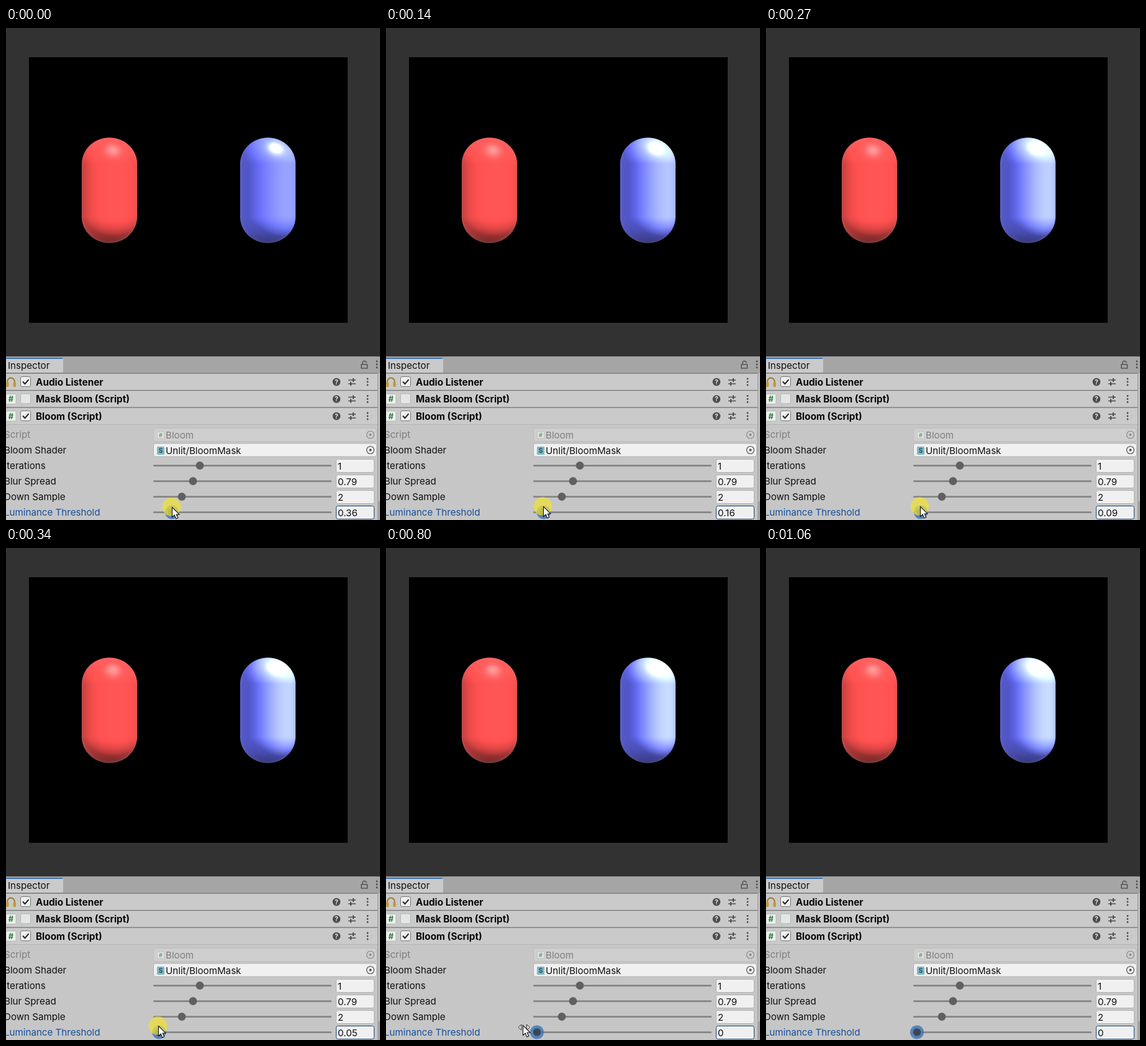
Animation of 602 by 791 pixels, one loop 1.28 s. Source, as an HTML page with a canvas:

```html
<!DOCTYPE html>
<html lang="en">
<head>
<meta charset="utf-8">
<title>Bloom threshold</title>
<style>
  html, body { margin: 0; width: 602px; height: 791px; overflow: hidden; background: #323232; }
  svg, canvas { position: absolute; display: block; }
  svg { left: 0; top: 0; }
  text { font: 15.15px Inter, sans-serif; fill: #101010; white-space: pre; }
  .bold { font-size: 15.3px; font-weight: 700; fill: #080808; }
  .dim { fill: #7d7d7d; }
  .focus { fill: #16509e; }
  .hash { font-weight: 700; fill: #2c7d46; text-anchor: middle; }
  .mark { fill: #e4e4e4; font-weight: 700; font-size: 10.5px; text-anchor: middle; }
  .shader { fill: #23506e; font-weight: 700; font-size: 10px; text-anchor: middle; }
</style>
</head>
<body>
<svg id="stage" width="602" height="791" viewBox="0 0 602 791">
  <rect width="602" height="791" fill="#323232"/>
  <rect x="37" y="47" width="513" height="427"/>
  <g id="panel"></g>
  <g id="slider">
    <circle r="11" fill="#3f78b8" opacity=".85"/>
    <circle r="6.2" fill="#3c4652"/>
  </g>
  <text id="value" x="534" y="785"></text>
  <g id="cursor">
    <circle id="glow" cx="-.5" cy="0" r="14.8" fill="#f0e038" opacity=".74"/>
    <path id="arrows" d="M-2 -1V8L-7 3.5ZM6.5 -1V8L11.5 3.5Z" fill="#fff" fill-opacity=".5" stroke="#333"/>
    <path d="M.5 .5V16.5L4.2 13L6.7 19L9.7 17.7L7.2 12H12Z" fill="#fff" stroke="#111" stroke-width="1.1"/>
  </g>
</svg>
<script>
const LOOP = 1280;
// start time, threshold, pointer x, pointer y
const STEPS = [
  [0, .36, 267, 770], [70, .25, 259, 769], [140, .16, 253, 769], [200, .12, 251, 769],
  [270, .09, 248, 769], [340, .05, 245, 768], [400, .01, 239, 768], [470, 0, 232, 767],
  [800, 0, 220, 767], [870, 0, 225, 765], [940, 0, 232, 761], [1000, 0, 238, 752],
  [1060, 0, 0, 0]
];
const HANDLES = 470, RELEASED = 800, GONE = 1060;
const $ = id => document.getElementById(id);

// Static inspector panel
const rect = (x, y, w, h, fill, extra = '') =>
  `<rect x="${x}" y="${y}" width="${w}" height="${h}" fill="${fill}" ${extra}/>`;
const text = (x, y, s, cls = '', extra = '') => `<text x="${x}" y="${y}" class="${cls}" ${extra}>${s}</text>`;
const dot = (x, y, r, fill = '#4c4c4c') => `<circle cx="${x}" cy="${y}" r="${r}" fill="${fill}"/>`;
const line = (d, color, w = 1.5) => `<path d="${d}" fill="none" stroke="${color}" stroke-width="${w}"/>`;
const menu = (x, y) => [-5, 0, 5].map(dy => dot(x, y + dy, 1.4)).join('');
const hash = (x, y, w, size) =>
  rect(x - w / 2, y - w / 2, w, w, '#edf1ed', 'rx="1.5" stroke="#b4bab4"') +
  text(x, y + size * .37, '#', 'hash', `style="font-size:${size}px"`);

function header(y, title, checked, icon) {
  const tools = `M551 ${y - 3}h12M551 ${y + 3}h12`;
  const knobs = `M559 ${y - 6}v6M555 ${y}v6`;
  return rect(0, y - 13.5, 598, 26.5, '#cacaca') +
    rect(0, y - 14.5, 598, 1.2, '#6f6f6f') + icon +
    rect(23.5, y - 8.5, 16, 16, checked ? '#efefef' : '#e2e6e4', `rx="2.5" stroke="${checked ? '#777' : '#b4b4b4'}"`) +
    (checked ? line(`M27 ${y - .5}l3.5 3.7l6 -7`, '#222', 2) : '') +
    text(48, y + 5.5, title, 'bold') +
    dot(532, y, 6.3) + text(532, y + 3.8, '?', 'mark') +
    line(tools, '#4c4c4c') + line(knobs, '#4c4c4c', 2) + menu(582, y);
}

function objectField(y, fill, border, color) {
  return rect(237.5, y - 10.5, 359, 21, fill, `rx="3" stroke="${border}"`) +
    `<circle cx="586.5" cy="${y}" r="6" fill="none" stroke="${color}" stroke-width="1.2"/>` + dot(586.5, y, 2, color);
}

function sliderRow(y, label, thumb, value) {
  const focused = thumb === undefined;
  return text(-3, y + 5, label, focused ? 'focus' : '') +
    rect(237, y - 1.7, 287, 2.6, '#858585', 'rx="1"') +
    rect(531.5, y - 10.5, 61, 21, '#f0f0f0', `rx="3" stroke="${focused ? '#1a4478' : '#b2b2b2'}"`) +
    (focused ? '' : dot(thumb, y - .5, 6.5, '#606060') + text(534, y + 6, value));
}

const headphones = line('M2 571v-2a6 6.5 0 0 1 12 0v2', '#9b7a2c', 2) +
  rect(0, 569, 4.5, 8, '#c39a35', 'rx="1.5"') + rect(11.5, 569, 4.5, 8, '#c39a35', 'rx="1.5"');

$('panel').innerHTML =
  rect(0, 528, 602, 263, '#c6c6c6') +
  rect(0, 528, 602, 27, '#a5a5a5') +
  `<path d="M0 530H89a3 3 0 0 1 3 3V554H0Z" fill="#cacaca"/>` +
  rect(0, 530, 91, 2, '#3c72b0') +
  text(3, 548, 'Inspector') +
  line('M574 541V538.5a3 3 0 0 1 6 0', '#555') + line('M572 541h9.5v6h-9.5Z', '#555') + menu(597, 541) +
  header(569, 'Audio Listener', true, headphones) +
  header(596.5, 'Mask Bloom (Script)', false, hash(8, 596.5, 16, 13)) +
  header(624, 'Bloom (Script)', true, hash(8, 624, 16, 13)) +
  rect(0, 637, 598, 1, '#b4b4b4') +
  text(-3, 659, 'Script', 'dim') + objectField(654, '#cfcfcf', '#bdbdbd', '#8c8c8c') +
  `<g opacity=".6">${hash(249, 654.5, 11, 9)}</g>` + text(257, 660, 'Bloom', 'dim') +
  text(-3, 684, 'Bloom Shader') + objectField(678.5, '#eff0ef', '#b2b2b2', '#505050') +
  rect(243, 673, 12, 13, '#7db9c2', 'rx="1.5"') + text(249, 683, 'S', 'shader') +
  text(257, 685, 'Unlit/BloomMask') +
  sliderRow(704, 'Iterations', 312, '1') +
  sliderRow(729, 'Blur Spread', 301, '0.79') +
  sliderRow(754, 'Down Sample', 283, '2') +
  sliderRow(779, 'Luminance Threshold') +
  rect(598, 555, 4, 236, '#bdbdbd') + rect(598, 555, 1, 236, '#999') + rect(599, 761, 3, 30, '#a4a4a4');

// Lit capsules, shaded per pixel in linear light; perspective flattens the caps a little
const W = 91, H = 172, RADIUS = 44.6, CAP = 42.3, HALF = 42.4;
const GLOW_TINT = [.41, .53, .6];
const dotp = (a, b) => a[0] * b[0] + a[1] * b[1] + a[2] * b[2];
const unit = v => v.map(c => c / Math.hypot(...v));

function capsule(left, albedo, azimuth, half, gloss) {
  const canvas = document.createElement('canvas');
  canvas.width = W;
  canvas.height = H;
  canvas.style.cssText = `left:${left}px;top:175px`;
  document.body.append(canvas);
  const a = azimuth * Math.PI / 180;
  const light = [.74 * Math.sin(a), .67, .74 * Math.cos(a)];
  return { ctx: canvas.getContext('2d'), albedo, light, half: unit(half), gloss };
}

function shade({ ctx, albedo, light, half, gloss }, bloom) {
  const img = ctx.createImageData(W, H);
  for (let py = 0; py < H; py++) for (let px = 0; px < W; px++) {
    const x = px + .5 - W / 2, y = H / 2 - py - .5;
    const capY = Math.sign(y) * Math.max(0, Math.abs(y) - HALF) * RADIUS / CAP;
    const dist = Math.hypot(x, capY);
    const cover = Math.min(1, Math.max(0, RADIUS - dist + .5));
    if (!cover) continue;
    const shrink = 1 / Math.max(RADIUS, dist);
    const nx = x * shrink, ny = capY * shrink;
    const n = [nx, ny, Math.sqrt(Math.max(0, 1 - nx * nx - ny * ny))];
    const lit = dotp(n, light);
    const ambient = .46 + (ny < 0 ? -.33 * ny * ny : .06 * ny);
    const spec = gloss * Math.max(0, dotp(n, half)) ** 34;
    const rim = .07 * (1 - n[2]) ** 4;
    // the blur carries light some way past the lower terminator
    const spread = lit - .4 * Math.min(0, ny) * light[1];
    const glow = bloom * Math.min(2.4, (Math.max(0, spread - .15) / .6) ** 2);
    const i = (py * W + px) * 4;
    albedo.forEach((base, k) => {
      const v = base * (ambient + .82 * Math.max(0, lit)) + spec + rim + glow * GLOW_TINT[k];
      img.data[i + k] = 255 * Math.min(1, v) ** (1 / 2.2);
    });
    img.data[i + 3] = 255 * cover;
  }
  ctx.putImageData(img, 0, 0);
}

const red = capsule(120.5, [1.08, .085, .083], 15, [.13, .53, .84], .22);
const blue = capsule(375.5, [.175, .2, 1.25], 46, [.29, .61, .74], 1.1);
shade(red, 0);

let shown = null;
function draw(time) {
  const step = STEPS.filter(s => s[0] <= time).pop();
  if (step === shown) return;
  const [start, threshold, x, y] = step;
  if (!shown || shown[1] !== threshold) shade(blue, 1 - 1.9 * threshold);
  shown = step;
  $('slider').setAttribute('transform', `translate(${243 + threshold * 67} 778.5)`);
  $('value').textContent = String(threshold);
  $('cursor').setAttribute('transform', `translate(${x} ${y})`);
  $('cursor').style.display = start >= GONE ? 'none' : '';
  $('glow').style.display = start >= RELEASED ? 'none' : '';
  $('arrows').style.display = start >= HANDLES ? '' : 'none';
}

const origin = performance.now();
function tick() {
  draw((performance.now() - origin) % LOOP);
  requestAnimationFrame(tick);
}
tick();
</script>
</body>
</html>
```
